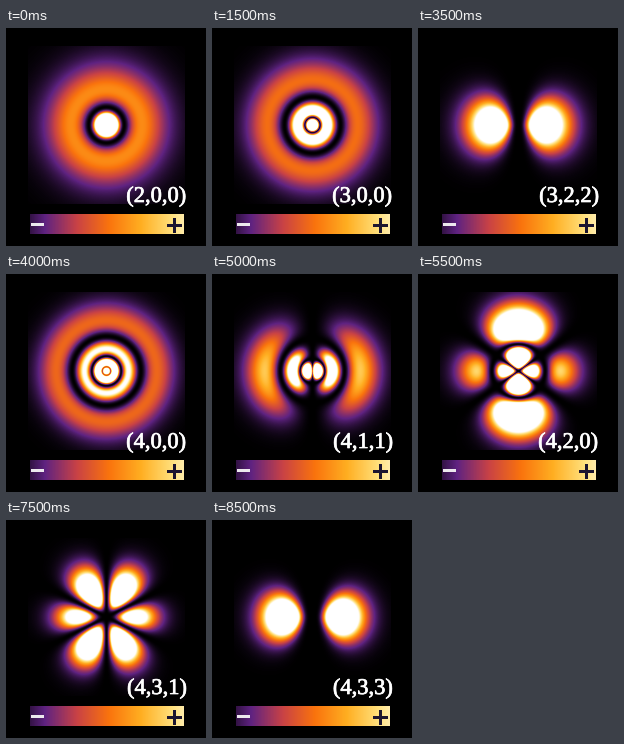
Recreate the animation shown at these times as a matplotlib script. Size 200 by 218 pixels, loop 9000 ms.

```python
import math

import matplotlib.pyplot as plt
import numpy as np
from matplotlib.animation import FuncAnimation
from matplotlib.colors import LinearSegmentedColormap
from matplotlib.patches import Rectangle
from matplotlib.patheffects import Normal, Stroke

W, H, DPI = 200, 218, 100
CX, CY, HALF = 100.5, 97.5, 78.5
BOHR_PX = 35.5      # pixels per Bohr radius, times n squared
GAIN = 0.97

STATES = [(n, l, m) for n in (2, 3, 4) for l in range(n) for m in range(l + 1)
          if (n, l, m) != (3, 2, 1)]

SUNSET = LinearSegmentedColormap.from_list("sunset", [
    (0.0, 0.0, 0.0), (0.373, 0.136, 0.507), (0.788, 0.260, 0.271),
    (0.979, 0.451, 0.051), (1.0, 0.683, 0.130), (1.0, 0.882, 0.491),
    (1.0, 1.0, 1.0)], N=512)

axis = (np.arange(314) + 0.5) / 314 * 2 * HALF - HALF
X, Y = np.meshgrid(axis, axis)
RADIUS = np.hypot(X, Y)
COS = Y / RADIUS
SIN = np.abs(X) / RADIUS


def laguerre(k, a, x):
    return sum((-1) ** i * math.comb(k + a, k - i) * x ** i / math.factorial(i)
               for i in range(k + 1))


def density(n, l, m):
    """Hydrogen probability density in the xz plane, scaled by n**6."""
    x = 2 * RADIUS * n / BOHR_PX
    fact = math.factorial
    norm = (2 / n) ** 3 * fact(n - l - 1) / (2 * n * fact(n + l))
    radial = norm * x ** (2 * l) * np.exp(-x) * laguerre(n - l - 1, 2 * l + 1, x) ** 2
    legendre = np.polynomial.Legendre.basis(l)
    if m:
        legendre = legendre.deriv(m)
    angular = (2 * l + 1) * fact(l - m) / fact(l + m) * (SIN ** m * legendre(COS)) ** 2
    return np.clip(GAIN * n ** 6 * radial * angular, 0, 1)


fig = plt.figure(figsize=(W / DPI, H / DPI), dpi=DPI, facecolor="black")
ax = fig.add_axes([0, 0, 1, 1])
ax.axis("off")


def picture(data, left, right, top, bottom):
    return ax.imshow(data, cmap=SUNSET, vmin=0, vmax=1, aspect="auto",
                     extent=(left, right, bottom, top), interpolation="bilinear")


def bar(x, y, w, h, color):
    ax.add_patch(Rectangle((x, y), w, h, color=color, lw=0, zorder=3))


cloud = picture(density(*STATES[0]), CX - HALF, CX + HALF, CY - HALF, CY + HALF)
picture(np.linspace(0.09, 0.89, 308)[None, :], 24, 178, 187, 206)
bar(25, 195, 13, 3, "#ece8ee")
bar(160.5, 195.5, 15, 3, "#1c1530")
bar(166.5, 189.5, 3, 15, "#1c1530")
label = ax.text(180, 174, "", color="white", family="Liberation Serif",
                fontsize=22.5 * 72 / DPI, ha="right", va="baseline", zorder=4,
                path_effects=[Stroke(linewidth=0.5, foreground="white"), Normal()])
ax.set_xlim(0, W)
ax.set_ylim(H, 0)


def update(i):
    n, l, m = STATES[i]
    cloud.set_data(density(n, l, m))
    label.set_text(f"({n},{l},{m})")
    label.set_x(181 if n > 2 and m > 0 else 180)
    return cloud, label


anim = FuncAnimation(fig, update, frames=len(STATES), interval=500,
                     repeat=True, repeat_delay=0, blit=False)
plt.show()
```
